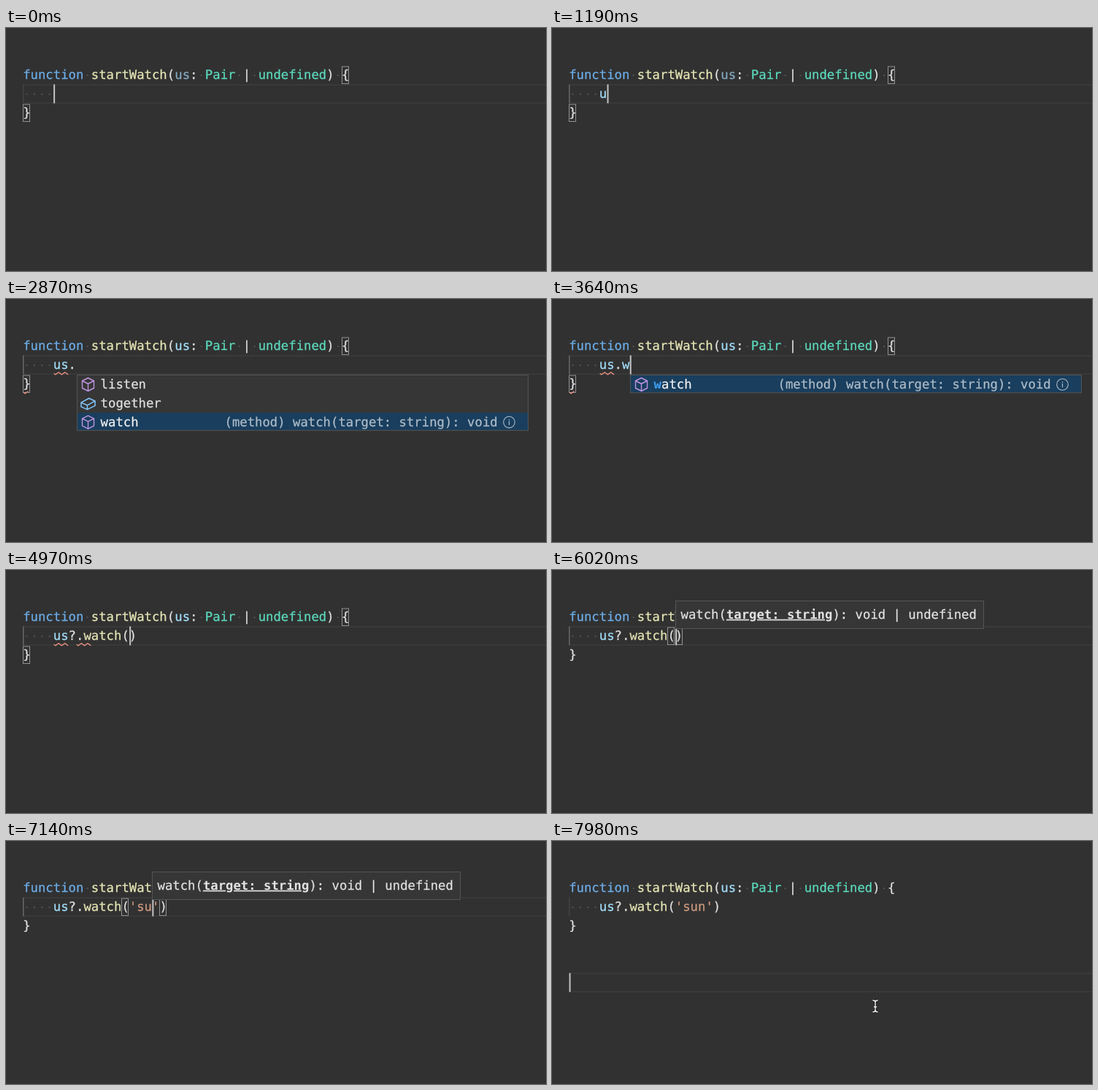
Recreate the animation shown at these times as an HTML page. Size 740 px wide and 334 px high, loop 8000 ms.

```html
<!DOCTYPE html>
<html lang="en">
<head>
<meta charset="utf-8">
<title>Optional chaining completion</title>
<style>
html, body { margin: 0; width: 100%; height: 100%; overflow: hidden; background: #313131; }
svg { display: block; width: 740px; height: 334px; }
text {
  font: 17.28px 'DejaVu Sans Mono', monospace;
  white-space: pre; text-rendering: geometricPrecision; stroke-width: .25;
}
.match { font-weight: bold; fill: #3fa2f7; stroke: none; }
.active { font-weight: bold; text-decoration: underline; stroke: none; }
.line { fill: none; stroke-width: 1.4; stroke-linejoin: round; }
</style>
</head>
<body>
<svg id="stage" viewBox="0 0 740 334"></svg>
<script>
const stage = document.getElementById('stage');
const LOOP = 8000, CELL = 10.403, LEFT = 23.2, ROW = 25.9, BASELINE = 18.2;
const C = {
  keyword: '#6daee9', fn: '#e6e6b6', plain: '#e2e2e2', type: '#5cdabd', name: '#a4dffc',
  faded: '#84a9bf', string: '#cf9a80', error: '#e79080', warning: '#d2b660',
  method: '#be95e0', field: '#84c6fc', detail: '#aebcc8', popup: '#363636', border: '#555'
};

// Typed states of the second line: start time, text, caret column
const typing = [
  [0, '', 4], [1050, 'u', 5], [1540, 'us', 6], [2200, 'us.', 7], [3480, 'us.w', 8],
  [4000, 'us.wa', 9], [4480, 'us?.watch', 13], [4760, 'us?.watch()', 14],
  [6300, "us?.watch('')", 15], [6860, "us?.watch('s')", 16],
  [7020, "us?.watch('su')", 17], [7200, "us?.watch('sun')", 18]
];
const CLICK = 7700;

const globals = [
  ['variable', '*us*'], ['method', '*us*erInfo'], ['method', '*u*nzip*S*ync'],
  ['method', '*u*nlink*S*ync'], ['method', '*u*times*S*ync'], ['variable', '*u*c*s*2'],
  ['method', '*u*ne*s*cape'], ['method', '*u*ne*s*cape'], ['variable', 'SSL_OP_SINGLE_DH_*US*E']
];
const members = [['method', 'listen'], ['field', 'together'], ['method', 'watch']];
const watchDetail = '(method) watch(target: string): void';
const usDetail = '(parameter) us: Pair | undefined';

const colX = col => LEFT + col * CELL;
const lineTop = n => 51.5 + n * 26;
const between = (t, a, b) => t >= a && t < b;
const rect = (x, y, w, h, fill, stroke = 'none') =>
  `<rect x="${x}" y="${y}" width="${w}" height="${h}" fill="${fill}" stroke="${stroke}"/>`;
const text = (x, y, color, s) => `<text x="${x}" y="${y}" fill="${color}" stroke="${color}">${s}</text>`;
const path = (d, stroke, extra = '') => `<path class="line" d="${d}" stroke="${stroke}" ${extra}/>`;

function tokens(line, col, parts) {
  let out = '';
  for (const [s, color] of parts) {
    out += text(colX(col), lineTop(line) + BASELINE, color, s);
    [...s].forEach((ch, i) => {
      if (ch === ' ') out += dot(line, col + i);
    });
    col += s.length;
  }
  return out;
}

function dot(line, col) {
  return rect(colX(col + .5) - 1, lineTop(line) + 12.6, 2, 2, '#545454');
}

function bracketBox(line, col) {
  return rect(Math.round(colX(col)) + .5, lineTop(line) + 1.5, 9, 23.5, 'none', '#929292');
}

function squiggle(line, col, count, color) {
  const x = colX(col) + .8, y = lineTop(line) + 24.8;
  let d = `M${x} ${y}`;
  for (let i = 0, dx = 2.2; dx < count * CELL; i++, dx += 4.3) d += `L${x + dx} ${y + (i % 2 ? -1.6 : 1.6)}`;
  return path(d, color);
}

function secondLine(s) {
  const parts = s.match(/^u?s?|\?|\.|\w+|[()]|'\w*'/g) || [];
  return parts.filter(Boolean).map((p, i) => {
    if (i === 0) return [p, C.name];
    if (p[0] === "'") return [p, C.string];
    if (/\w/.test(p)) return [p, p === 'watch' ? C.fn : C.name];
    return [p, C.plain];
  });
}

const slab = 'M-9-1L1-6.5 9-3V3L-1 8-9 4.500Z M-9-1L-1 2.500 9-3M-1 2.500V8';
function icon(kind, x, y) {
  const at = s => `transform="translate(${x} ${y}) scale(${s})"`;
  if (kind === 'method')
    return path('M0-9L8-5V5L0 9-8 5V-5ZM-8-5L0-1 8-5M0-1V9', C.method, at(1));
  if (kind === 'field') return path(slab, C.field, at(1.06));
  return path('M-6-6H-9.500V6H-6M6-6H9.500V6H6', C.field, at(1)) +
    path(slab, C.field, at(.52) + ' style="stroke-width:2.500"');
}

function suggestions(col, items, selected, detail) {
  const x = Math.round(colX(col) + .8), w = 618, top = 104.5;
  const height = items.length * ROW - 1.5;
  let out = rect(x + .5, top, w, height, C.popup);
  items.forEach(([kind, label], i) => {
    const y = top + i * ROW;
    if (i === selected) {
      out += rect(x + 1, y, w - 1, ROW - 1.5, '#193e5e');
      out += text(x + w - 41 - detail.length * CELL, y + BASELINE, C.detail, detail);
      const ix = x + w - 25.5, iy = y + 13;
      out += `<circle class="line" cx="${ix}" cy="${iy}" r="7.8" stroke="${C.detail}" style="stroke-width:1.1"/>` +
        rect(ix - .6, iy - 1.5, 1.2, 5.5, C.detail) + rect(ix - .6, iy - 4, 1.2, 1.5, C.detail);
    }
    const marked = label.split('*').map((s, k) => k % 2 ? `<tspan class="match">${s}</tspan>` : s).join('');
    out += icon(kind, x + 15.5, y + 13) + text(x + 32.6, y + BASELINE, i === selected ? '#f2f2f2' : C.plain, marked);
  });
  if (items.length > 8) out += rect(x + w - 16, 105, 16, 219, '#5d5d5d');
  return out + rect(x + .5, top, w, height, 'none', C.border);
}

function signature(col) {
  const x = Math.round(colX(col) + .3);
  return rect(x + .5, 42.5, 422, 38, C.popup, C.border) +
    text(x + 7.5, 66.7, C.plain, 'watch(<tspan class="active">target: string</tspan>): void | undefined');
}

function mouse(t) {
  if (t < 7370) return '';
  const left = (1 - Math.min(1, (t - 7370) / 310)) ** 3;
  const at = `transform="translate(${(443 + 244 * left).toFixed(1)} ${(227 + 65 * left).toFixed(1)})"`;
  const d = 'M-3.500-8Q0-8 0-5.500Q0-8 3.500-8M0-6V6M-2 1H2M-3.500 8Q0 8 0 5.500Q0 8 3.500 8';
  return path(d, '#1c1c1c', at + ' style="stroke-width:3"') + path(d, '#f2f2f2', at);
}

function popup(t, col) {
  if (between(t, 1250, 1540))
    return suggestions(col, globals.map(([k, s]) => [k, s.replace('*us*', '*u*s')]), 0, usDetail);
  if (between(t, 1540, 2200)) return suggestions(col, globals, 0, usDetail);
  if (between(t, 2300, 3480)) return suggestions(col, members, 2, watchDetail);
  if (between(t, 3480, 4000)) return suggestions(col, [['method', '*w*atch']], 0, watchDetail);
  if (between(t, 4000, 4480)) return suggestions(col, [['method', '*wa*tch']], 0, watchDetail);
  return between(t, 5180, CLICK) ? signature(col) : '';
}

function scene(t) {
  const [since, typed, col] = typing.findLast(s => s[0] <= t);
  const clicked = t >= CLICK;
  const current = clicked ? 5 : 1;
  let out = rect(0, 0, 740, 334, '#313131');

  out += rect(24, lineTop(current) - .3, 716, 1.8, '#3a3a3a') +
    rect(24, lineTop(current) + 24.7, 716, 1.8, '#3a3a3a');
  out += rect(23.2, lineTop(1), 1.2, 26, clicked || !typed ? '#484848' : '#777');

  out += tokens(0, 0, [
    ['function', C.keyword], [' ', C.plain], ['startWatch', C.fn], ['(', C.plain],
    ['us', t < 1900 ? C.faded : C.name], [': ', C.plain], ['Pair', C.type],
    [' | ', C.plain], ['undefined', C.type], [') {', C.plain]
  ]);
  for (let i = 0; i < 4; i++) out += dot(1, i);
  out += tokens(1, 4, secondLine(typed)) + tokens(2, 0, [['}', C.plain]]);

  if (t < 5060) out += bracketBox(0, 42) + bracketBox(2, 0);
  else if (!clicked) out += bracketBox(1, 13) + bracketBox(1, 3 + typed.length);

  if (between(t, 1450, 2450)) out += squiggle(1, 4, 1, C.warning);
  if (between(t, 2450, 5060)) out += squiggle(1, 4, 2, C.error);
  if (between(t, 2600, 3950)) out += squiggle(2, 0, 1, C.error);
  if (between(t, 4150, 5060)) out += squiggle(1, 7, 2, C.error);

  const idle = t - (clicked ? CLICK : since);
  if (idle % 1000 < 500) out += rect(colX(clicked ? 0 : col) + .3, lineTop(current), 2, 26, '#c4c4c4');

  return out + popup(t, col) + mouse(t);
}

let shown = '';
function frame(now) {
  const next = scene(now % LOOP);
  if (next !== shown) stage.innerHTML = shown = next;
  requestAnimationFrame(frame);
}
frame(performance.now());
</script>
</body>
</html>
```
